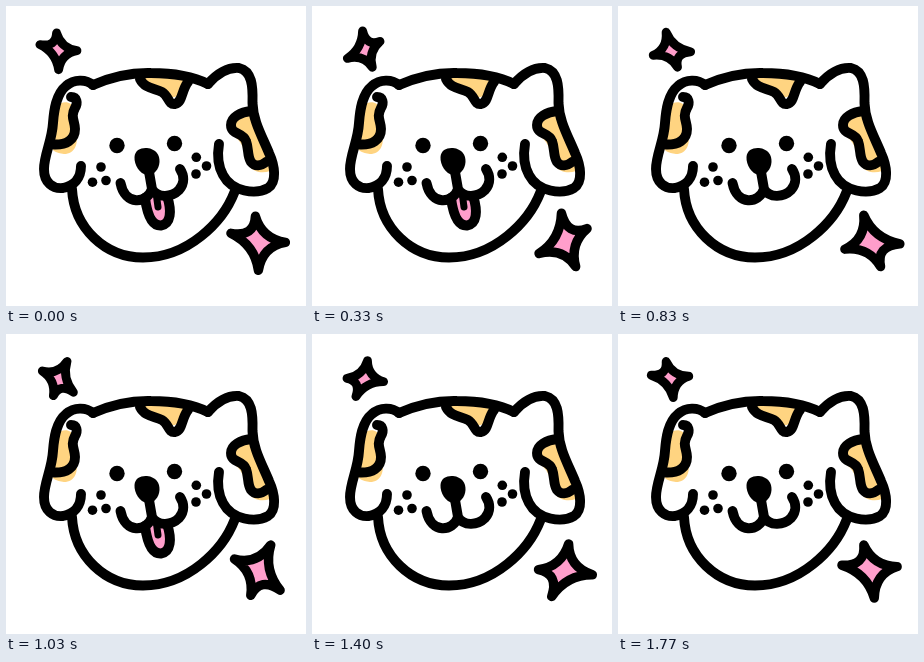
An HTML page that plays this animation: 300x300 px, repeating every 1.81 s.

```html
<!DOCTYPE html>
<html lang="en">
<head>
<meta charset="utf-8">
<title>Happy dog</title>
<style>
  html, body { margin: 0; width: 100%; height: 100%; overflow: hidden; background: #fff; }
  svg { display: block; width: 100%; height: 100%; }
  .line { fill: none; stroke: #000; stroke-width: 9.9; stroke-linecap: round; stroke-linejoin: round; }
  .patch { fill: #ffd481; }
  .pink { fill: #ff9ecb; }
</style>
</head>
<body>
<svg viewBox="0 0 300 300">
  <defs>
    <path id="star" d="M-3.3-26Q3.3-3.6 26.7 0Q3.7 3.9-.3 28Q-3.9 2.7-27.8-9Q-4.4-4.9-3.3-26Z"/>
  </defs>

  <g class="patch">
    <path d="M50 101C56 94 66 95 68 103L70 124C73 138 69 148 58 148C50 147 46 145 45 140Z"/>
    <path d="M131 70C137 82 150 80 158 88C164 94 172 92 176 84C182 82 186 78 186 71C170 66 145 66 131 70Z"/>
    <path d="M246 105C232 105 220 112 221 121C224 130 236 132 238 146C238 160 250 170 264 165L262 147C252 130 246 116 246 105Z"/>
  </g>

  <g class="line">
    <!-- head and ears -->
    <path d="M87 79C105 71 125 66.5 145 67C168 67 188 71 202 78"/>
    <path d="M87 79C80 73 68 73 60 80C50 88 48 104 47 117C46 135 38 149 38 163C38 177 47 183 57 182C68 180 75 172 75 160"/>
    <path d="M202 78C209 70 220 61 233 62C246 65 247 80 246.500 97C247 115 256 130 263 147C269 160 271 176 262 182C250 189 226 186 217 169C212 160 211 150 213 138"/>
    <path d="M66 183C68 222 99 251.500 137 251.500C182 251.500 217 216 228.500 186"/>
    <!-- patch edges -->
    <path d="M65 91C71 91 72 97 69 102C64 111 69 115 69 123C69 134 60 139 48 138.500"/>
    <path d="M134 73C139 83 149 82 156 86C163 90 162 99 169 98C177 96 175 85 182 76"/>
    <path d="M245 105C235 106 225 111 225 119C225 129 237 126 240 135C243 143 241 150 245 156C249 161 255 160 260 156"/>
  </g>

  <g id="tongue" class="line">
    <path class="pink" d="M139 192C141 207 145 220 155 219.500C165 218 166 205 161 190"/>
    <path d="M150.500 190L152 201" style="stroke-width:7"/>
  </g>

  <path class="line" d="M142 160L146 183C141 198 119 200 114.500 177M146 183C152 193 166 191 173 184C179 177 178 169 174 163"/>
  <path d="M128.500 151C129 144 135 141.500 141 142C150 143 154 149 153.500 156C153 164 147 170 141 169C134 168 128 159 128.500 151Z"/>
  <g>
    <circle cx="111" cy="139.500" r="7.700"/>
    <circle cx="168.500" cy="137.500" r="7.700"/>
    <circle cx="95" cy="161" r="4.800"/>
    <circle cx="86.500" cy="176.200" r="4.800"/>
    <circle cx="100" cy="174.500" r="4.800"/>
    <circle cx="190.300" cy="151.300" r="4.800"/>
    <circle cx="200.500" cy="160" r="4.800"/>
    <circle cx="190" cy="168" r="4.800"/>
  </g>

  <g transform="translate(252.700 236.300)">
    <use href="#star" class="line pink spin" style="stroke-width:9.4"/>
  </g>
  <g transform="translate(52.800 44.700) scale(.68)">
    <use href="#star" class="line pink spin" style="stroke-width:13"/>
  </g>
</svg>
<script>
  const LOOP = 1810;
  const stars = document.querySelectorAll('.spin');
  const tongue = document.getElementById('tongue');

  function draw(now) {
    const phase = now % LOOP / LOOP;
    for (const star of stars) star.setAttribute('transform', `rotate(${phase * 360})`);
    // the tongue shows in the first half of each of two beats
    tongue.style.display = phase * 2 % 1 < 0.5 ? '' : 'none';
  }

  let start;
  function tick(now) {
    start ??= now;
    draw(now - start);
    requestAnimationFrame(tick);
  }
  draw(0);
  requestAnimationFrame(tick);
</script>
</body>
</html>
```
